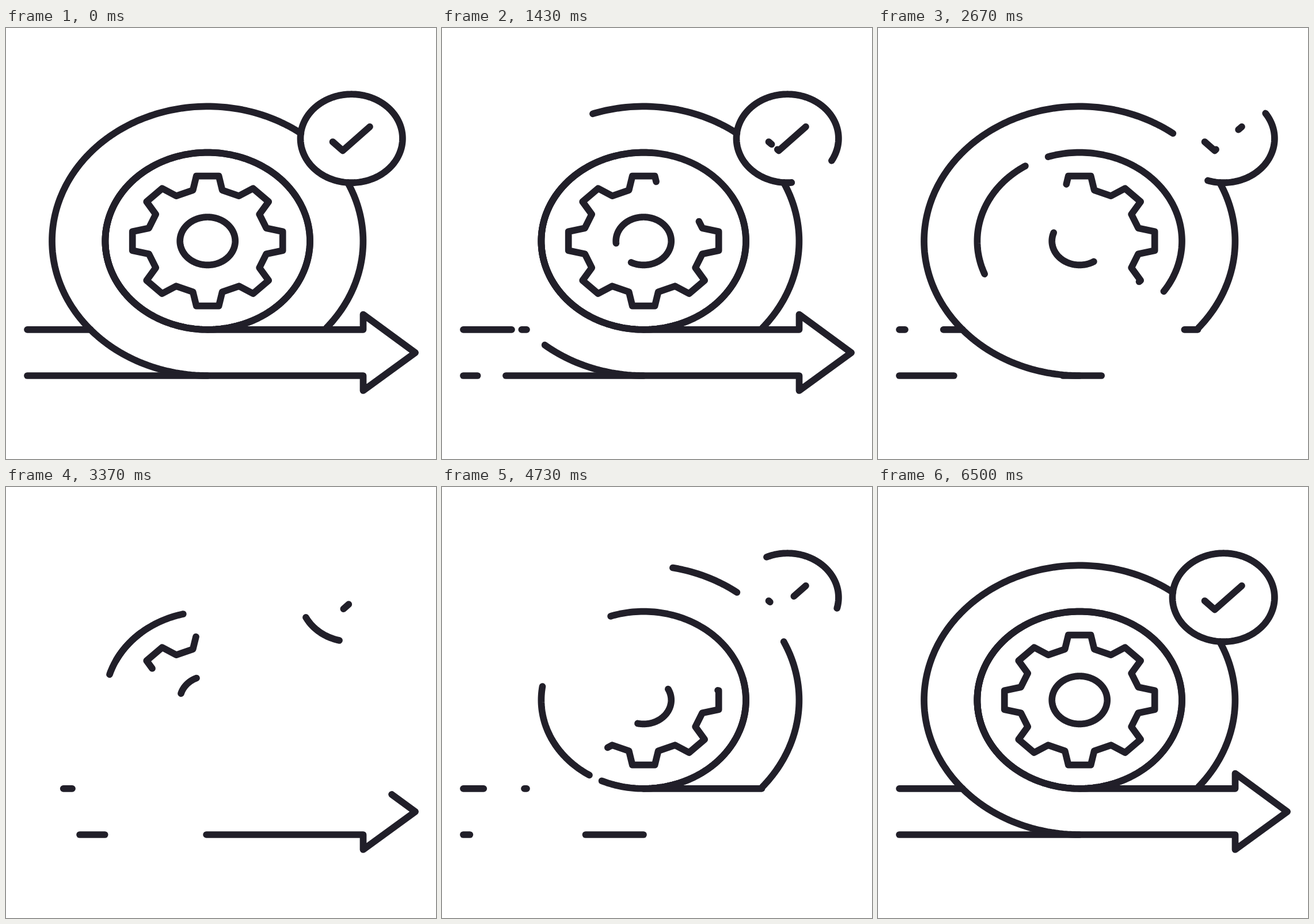
Animation, 747 px wide and 750 px high, one loop 7.01 s. Source, as an HTML page with a canvas:

```html
<!DOCTYPE html>
<html lang="en">
<head>
<meta charset="utf-8">
<title>Sprint cycle icon</title>
<style>
  html, body { margin: 0; width: 100%; height: 100%; overflow: hidden; background: #fff; }
  canvas { display: block; }
</style>
</head>
<body>
<canvas id="stage" width="747" height="750"></canvas>
<script>
const ctx = document.getElementById('stage').getContext('2d');
const LOOP = 7010, FPS = 30, FIRST = 30, SPAN = 165;
const CX = 350.2, CY = 370.7;

// Points along an ellipse, angles in degrees, 0 = right, 90 = down
function arc(cx, cy, rx, ry, from, to) {
  const n = Math.ceil(Math.abs(to - from) / 1.5), pts = [];
  for (let i = 0; i <= n; i++) {
    const a = (from + (to - from) * i / n) * Math.PI / 180;
    pts.push([cx + rx * Math.cos(a), cy + ry * Math.sin(a)]);
  }
  return pts;
}
const outer = (from, to) => arc(CX, CY, 270.2, 234.3, from, to);
const inner = (from, to) => arc(CX, CY, 177.8, 154.1, from, to);

function gear() {
  const q = [[130.5, -16.5], [102, -22.5], [90, -46.5], [106, -68.5],
             [79, -91.5], [54.5, -78.5], [25.5, -88.5], [19.5, -113]];
  const back = q.slice().reverse();
  const flip = (pts, sx, sy) => pts.map(([x, y]) => [CX + x * sx, CY + y * sy]);
  return [[CX + 130.5, CY + 16.5], ...flip(q, 1, 1), ...flip(back, -1, 1),
          ...flip(q, -1, -1), ...flip(back, 1, -1)];
}

function track(pts, closed = false) {
  const at = [0];
  for (let i = 1; i < pts.length; i++) {
    at.push(at[i - 1] + Math.hypot(pts[i][0] - pts[i - 1][0], pts[i][1] - pts[i - 1][1]));
  }
  return { pts, at, len: at[at.length - 1], closed };
}

const tracks = [
  // ring, arrow, inner ring and the right-hand arc in one stroke
  track([
    ...outer(-53.1, -270),
    [620.5, 605], [620.5, 631], [711, 565], [620.5, 498.5], [620.5, 524.8],
    ...inner(90, 450),
    [555.5, 524.8],
    ...outer(40.2, -25.7)
  ]),
  track(inner(0, -360), true),
  // left arc, run there and back
  track([...inner(180, 238), ...inner(238, 122), ...inner(122, 180)], true),
  track(gear(), true),
  track(arc(CX, CY, 48, 41.7, 90, 450), true),
  track(arc(600.2, 192.2, 88.7, 77, 0, 360), true),
  track([[567.5, 198], [585, 213.3], [632, 171.8]]),
  track([[147, 524.8], [37, 524.8]]),
  track([[37, 605], [350, 605]])
];

// Part of a track between two fractions of its length
function slice(t, a, b) {
  const from = a * t.len, to = b * t.len, out = [];
  const point = (i, d) => {
    const k = (d - t.at[i - 1]) / ((t.at[i] - t.at[i - 1]) || 1);
    const p = t.pts[i - 1], q = t.pts[i];
    return [p[0] + (q[0] - p[0]) * k, p[1] + (q[1] - p[1]) * k];
  };
  for (let i = 1; i < t.pts.length; i++) {
    if (t.at[i] < from) continue;
    if (!out.length) out.push(point(i, from));
    if (t.at[i] >= to) { out.push(point(i, to)); break; }
    out.push(t.pts[i]);
  }
  return out;
}

function stroke(pts, closed) {
  ctx.beginPath();
  pts.forEach(([x, y]) => ctx.lineTo(x, y));
  if (closed) ctx.closePath();
  ctx.stroke();
}

function trim(t, start, end) {
  if (end <= 1) return stroke(slice(t, start, end));
  const head = slice(t, start, 1), tail = slice(t, 0, end - 1);
  if (t.closed) return stroke(head.concat(tail));
  stroke(head);
  stroke(tail);
}

function draw(ms) {
  const frame = Math.floor((ms + 4) * FPS / 1000);
  const u = Math.min(1, Math.max(0, (frame - FIRST) / SPAN));
  ctx.fillStyle = '#fff';
  ctx.fillRect(0, 0, 747, 750);
  ctx.strokeStyle = '#211f29';
  ctx.lineWidth = 11.7;
  ctx.lineCap = ctx.lineJoin = 'round';

  if (u === 0 || u === 1) {
    tracks.forEach(t => stroke(t.pts, t.closed));
    return;
  }
  // first half eats the line from its start, second half regrows its end
  const start = u + Math.min(1, 2 * u), end = u + 1 + Math.max(0, 2 * u - 1);
  if (end - start < 1e-4) return;
  const turn = Math.floor(start);
  tracks.forEach(t => trim(t, start - turn, end - turn));
}

const t0 = performance.now();
function tick() {
  draw((performance.now() - t0) % LOOP);
  requestAnimationFrame(tick);
}
tick();
</script>
</body>
</html>
```
